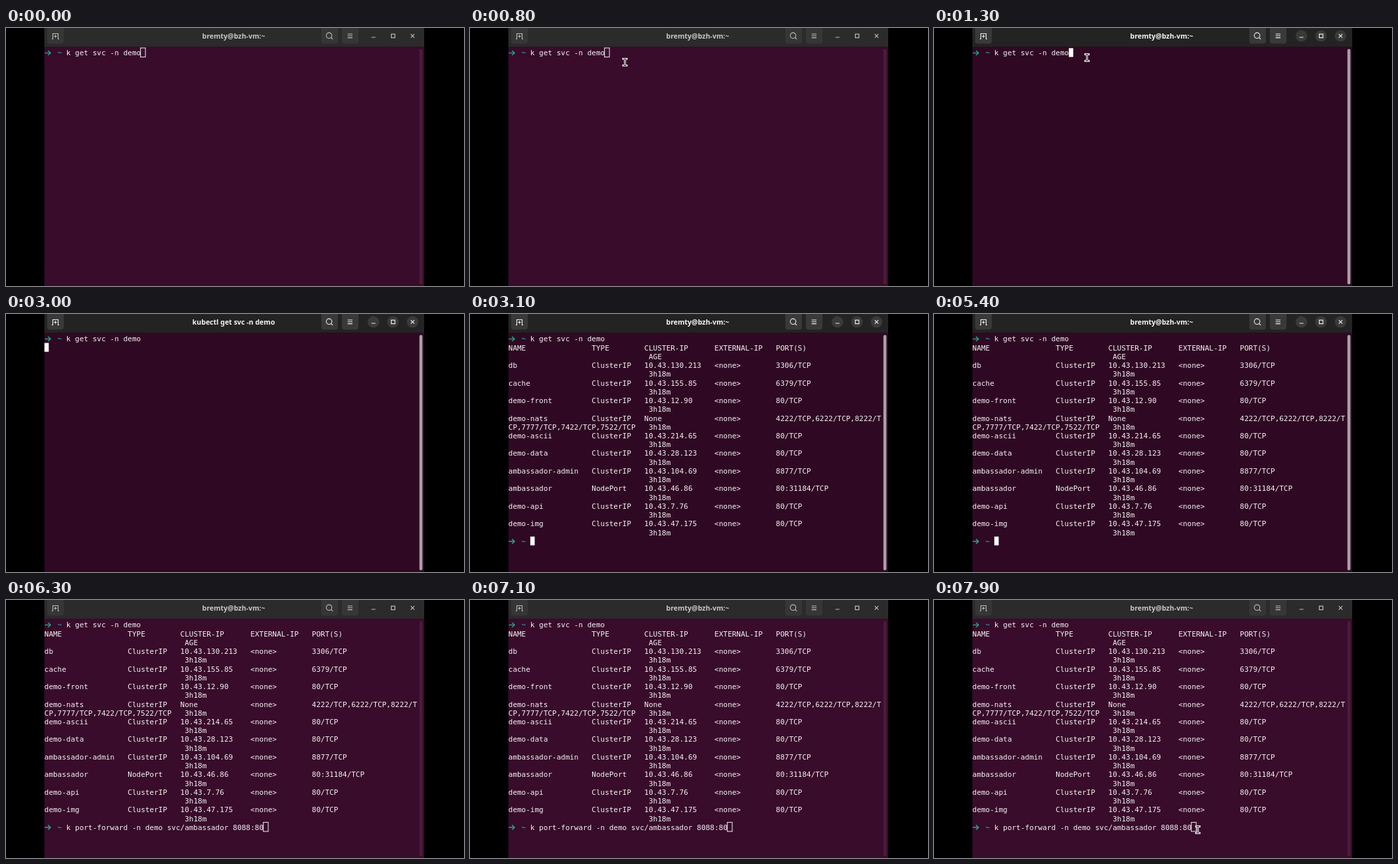
These frames come from a looping animation (690 by 388 pixels, 8000 ms). An HTML page with a canvas:

```html
<!DOCTYPE html>
<html lang="en">
<head>
<meta charset="utf-8">
<title>Terminal</title>
<style>
  html, body { margin: 0; width: 100%; height: 100%; overflow: hidden; background: #000; }
  canvas { display: block; width: 690px; height: 388px; }
</style>
</head>
<body>
<canvas id="stage"></canvas>
<script>
const W = 690, H = 388, LOOP = 8000, LEAD = 15;
const LEFT = 57.6, RIGHT = 630, BAR = 28;
const TEXT_X = 57.8, CELL = 6.607, ROW = 13.235;
const MONO = '10.975px "DejaVu Sans Mono", monospace';
const TITLE = 'bold 10.5px "Noto Sans", sans-serif';

const canvas = document.getElementById('stage');
const ratio = window.devicePixelRatio || 1;
canvas.width = W * ratio;
canvas.height = H * ratio;
const ctx = canvas.getContext('2d');
ctx.scale(ratio, ratio);

const SERVICES = [
  ['db', 'ClusterIP', '10.43.130.213', '3306/TCP'],
  ['cache', 'ClusterIP', '10.43.155.85', '6379/TCP'],
  ['demo-front', 'ClusterIP', '10.43.12.90', '80/TCP'],
  ['demo-nats', 'ClusterIP', 'None', '4222/TCP,6222/TCP,8222/T', 'CP,7777/TCP,7422/TCP,7522/TCP'],
  ['demo-ascii', 'ClusterIP', '10.43.214.65', '80/TCP'],
  ['demo-data', 'ClusterIP', '10.43.28.123', '80/TCP'],
  ['ambassador-admin', 'ClusterIP', '10.43.104.69', '8877/TCP'],
  ['ambassador', 'NodePort', '10.43.46.86', '80:31184/TCP'],
  ['demo-api', 'ClusterIP', '10.43.7.76', '80/TCP'],
  ['demo-img', 'ClusterIP', '10.43.47.175', '80/TCP']
];
const LIST_CMD = 'k get svc -n demo';
const FORWARD_CMD = 'k port-forward -n demo svc/ambassador 8088:80';
const ENTER = 2800, OUTPUT = 3100, PASTE = 6000;
const BLINK_OFF = [[1900, 2500], [3500, 4100], [4700, 5400], [5900, PASTE]];

// Pointer keys: time, x, y
const ARRIVE = [[60, 780, 454], [100, 626, 346], [200, 243, 75], [400, 243, 75], [1000, 230, 44], [ENTER, 230, 44]];
const RETURN = [[7200, 608, 396], [7600, 533, 356], [7900, 397, 345], [LOOP, 397, 345]];

const clamp = v => Math.max(0, Math.min(1, v));
const ramp = (t, a, b) => clamp((t - a) / (b - a));
const mix = (a, b, k) =>
  `rgb(${a.map((v, i) => Math.round(v + (b[i] - v) * k)).join()})`;

function rounded(x, y, w, h, r, fill) {
  ctx.fillStyle = fill;
  ctx.beginPath();
  ctx.roundRect(x, y, w, h, r);
  ctx.fill();
}

function lines(color, width, ...paths) {
  ctx.strokeStyle = color;
  ctx.lineWidth = width;
  ctx.beginPath();
  for (const path of paths)
    path.forEach(([x, y], i) => i ? ctx.lineTo(x, y) : ctx.moveTo(x, y));
  ctx.stroke();
}

function text(str, col, row, color = '#f6f2f5') {
  ctx.fillStyle = color;
  ctx.fillText(str, TEXT_X + col * CELL, 41.4 + row * ROW);
}

function drawTitleBar(title, focus) {
  const icon = mix([190, 190, 190], [240, 240, 240], focus);
  const button = mix([54, 54, 54], [57, 57, 57], focus);
  ctx.fillStyle = mix([43, 43, 43], [35, 35, 35], focus);
  ctx.fillRect(LEFT, 0, RIGHT - LEFT, BAR);

  ctx.font = TITLE;
  ctx.textAlign = 'center';
  ctx.fillStyle = mix([198, 198, 198], [246, 246, 246], focus);
  ctx.fillText(title, 343, 15.6);
  ctx.textAlign = 'left';

  for (const x of [62, 475, 506]) rounded(x, -4, 25, 27.5, 4, button);
  lines(icon, 1.1,
    [[69, 16.5], [70.5, 16.5], [70.5, 8.5], [78.5, 8.5], [78.5, 16.5], [80, 16.5]],
    [[72.2, 12.5], [76.8, 12.5]], [[74.5, 10.2], [74.5, 14.8]]);
  ctx.beginPath();
  ctx.arc(486.7, 11.3, 4.2, 0, Math.PI * 2);
  ctx.stroke();
  lines(icon, 1.2, [[489.7, 14.3], [492.3, 16.9]]);
  lines(icon, 1.1, ...[9, 11.8, 14.6].map(y => [[514.7, y], [522, y]]));

  ctx.globalAlpha = focus;
  for (const x of [553.5, 583, 612.5]) rounded(x - 8.7, 3.2, 17.4, 17.4, 8.7, '#3a3a3a');
  ctx.globalAlpha = 1;
  lines(icon, 1.2, [[550.6, 14], [556.6, 14]],
    [[609.8, 9.2], [615.2, 14.6]], [[615.2, 9.2], [609.8, 14.6]]);
  ctx.strokeRect(580.5, 9.2, 5.4, 5.4);
}

function drawPrompt(row, command) {
  const y = 37.5 + row * ROW;
  lines('#26987c', 1.7, [[58.4, y], [66.6, y]], [[63.4, y - 3.5], [67, y], [63.4, y + 3.5]]);
  ctx.font = 'bold ' + MONO;
  text('~', 3, row, '#2a9aa2');
  ctx.font = MONO;
  text(command, 5, row);
}

function drawTable() {
  const put = (cells, row) => cells.forEach((s, i) => text(s, [0, 19, 31, 47, 61][i], row));
  put(['NAME', 'TYPE', 'CLUSTER-IP', 'EXTERNAL-IP', 'PORT(S)'], 1);
  text('AGE', 32, 2);
  SERVICES.forEach(([name, type, ip, port, rest = ''], i) => {
    const row = 3 + i * 2;
    put([name, type, ip, '<none>', port], row);
    text(rest, 0, row + 1);
    text('3h18m', 32, row + 1);
  });
}

function drawCursor(col, row, focused) {
  const x = TEXT_X + col * CELL, y = 30.3 + row * ROW;
  if (focused) {
    ctx.fillStyle = '#fff';
    ctx.fillRect(x, y, CELL, ROW);
  } else {
    ctx.strokeStyle = '#e6dce3';
    ctx.lineWidth = 1.1;
    ctx.strokeRect(x - 0.5, y - 0.3, CELL + 0.8, ROW + 0.4);
  }
}

function drawPointer(t) {
  const keys = t < ENTER ? ARRIVE : RETURN;
  const i = keys.findIndex((k, n) => n && t >= keys[n - 1][0] && t < k[0]);
  if (i < 1) return;
  const [t0, x0, y0] = keys[i - 1], [t1, x1, y1] = keys[i];
  const p = ramp(t, t0, t1);
  const k = t0 === 400 ? p * p * (3 - 2 * p) : p;
  const x = x0 + (x1 - x0) * k + 0.5, y = y0 + (y1 - y0) * k + 0.5;
  const beam = [[[x - 2.5, y - 5], [x + 2.5, y - 5]], [[x, y - 5], [x, y + 5]],
    [[x - 2.5, y + 5], [x + 2.5, y + 5]]];
  ctx.lineCap = 'square';
  lines('#fff', 2.8, ...beam);
  ctx.lineCap = 'butt';
  lines('#201018', 0.9, ...beam);
}

function draw(t) {
  const focus = ramp(t, 1120, 1320) * (1 - ramp(t, 5950, 6200));
  const running = t >= ENTER && t < OUTPUT, listed = t >= OUTPUT;

  ctx.fillStyle = '#000';
  ctx.fillRect(0, 0, W, H);
  ctx.save();
  ctx.beginPath();
  ctx.rect(LEFT, 0, RIGHT - LEFT, H);
  ctx.clip();
  ctx.fillStyle = mix([56, 12, 42], [47, 9, 35], focus);
  ctx.fillRect(LEFT, 0, RIGHT - LEFT, H);
  drawTitleBar(running ? 'kubectl get svc -n demo' : 'bremty@bzh-vm:~', focus);
  rounded(622.8, 31.5, 4.6, 354, 2.3, mix([76, 28, 61], [170, 160, 167], focus));

  drawPrompt(0, LIST_CMD);
  if (listed) {
    drawTable();
    drawPrompt(23, t >= PASTE ? FORWARD_CMD : '');
  }

  const col = running ? 0 : !listed ? 22 : t >= PASTE ? 5 + FORWARD_CMD.length : 5;
  const row = running ? 1 : listed ? 23 : 0;
  if (!BLINK_OFF.some(([a, b]) => t >= a && t < b)) drawCursor(col, row, focus > 0.5);
  drawPointer(t);
  ctx.restore();
}

const start = performance.now();
function tick() {
  draw((performance.now() - start + LEAD) % LOOP);
  requestAnimationFrame(tick);
}
tick();
</script>
</body>
</html>
```
